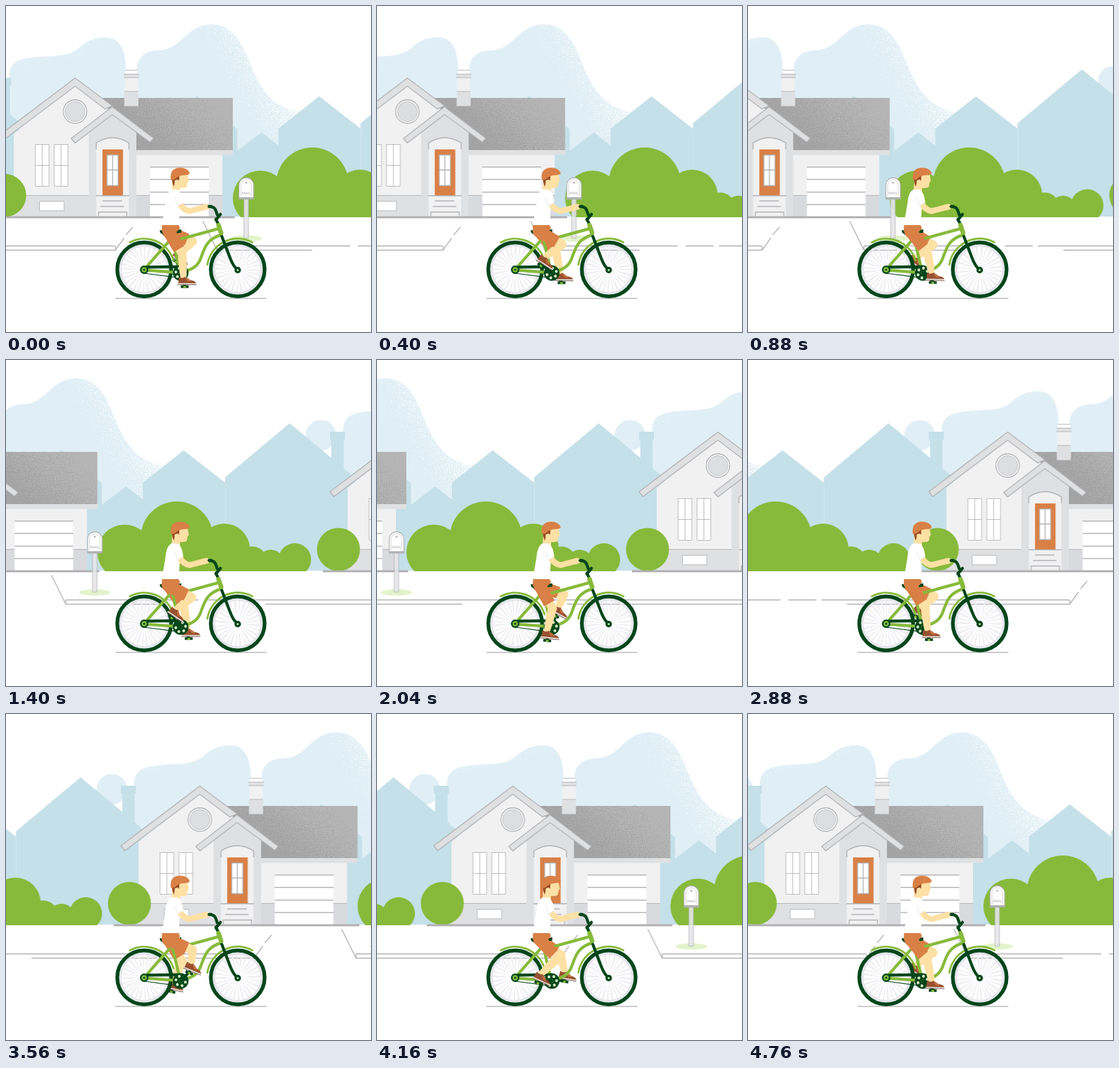
An HTML page without scripts that plays this animation: 560 by 500 pixels, repeating every 4.8 s.

```html
<!DOCTYPE html>
<html lang="en">
<head>
<meta charset="utf-8">
<title>Bike ride</title>
<style>
  @property --f { syntax: '<number>'; inherits: true; initial-value: 0; }
  @keyframes ride { to { --f: 120; } }

  html, body { margin: 0; width: 100%; height: 100%; overflow: hidden; background: #fff; }
  body { position: relative; animation: ride 4.8s steps(120) -1ms infinite; }
  svg { position: absolute; left: 0; top: 0; height: 500px; }
  .town { width: 1300px; will-change: transform; transform: translateX(calc(var(--f) * -5.94px)); }
  .road { width: 1400px; will-change: transform; transform: translateX(calc(var(--f) * -6.64px)); }
  .rider { width: 560px; }

  .wall { fill: #f1f1f2; }
  .shade { fill: #dfe0e2; }
  .line { fill: none; stroke: #b1b1b3; stroke-width: 1.4; }
  .trim { stroke: #b1b1b3; stroke-width: 1.3; }
  .fine { stroke-width: .9; }
  .white { fill: #fff; }
  .far-house { fill: #c5e0e9; }
  .leaf { fill: #87ba3a; }
  .orange { fill: #d98046; }
  .skin { fill: #fde0a4; }
  .dark { fill: #00461b; }
  .tube, .rod { fill: none; stroke: #87ba3a; stroke-width: 4.5; stroke-linecap: round; stroke-linejoin: round; }
  .rod { stroke: #00461b; }
  .thin { stroke-width: 1.2; }
  .slim { stroke-width: 3; }
  .thick { stroke-width: 7; }
  .limb { fill: none; stroke: #fde0a4; stroke-width: 9; stroke-linecap: round; stroke-linejoin: round; }

  /* The pedal angle sets foot and thigh; the shin spans from knee to ankle. */
  .rider { --turn: calc((72 + 14.85 * var(--f)) * 1deg); }
  .near { --t: var(--turn); }
  .far { --t: calc(var(--turn) + 180deg); }
  .leg {
    --tilt: calc(17deg - 17deg * cos(var(--t) - 60deg));
    --thigh: calc(40deg + 21deg * sin(var(--t) - 10deg));
    --px: calc(18 + 20 * cos(var(--t)));
    --py: calc(62.5 + 20 * sin(var(--t)));
    --dx: calc(var(--px) - 2 * cos(var(--tilt)) + 12 * sin(var(--tilt)) - 39 * cos(var(--thigh)));
    --dy: calc(var(--py) - 2 * sin(var(--tilt)) - 12 * cos(var(--tilt)) - 39 * sin(var(--thigh)));
    transform: translate(250px, 347px);
  }
  .thigh { transform: rotate(var(--thigh)); }
  .shin {
    transform: rotate(var(--thigh)) translate(39px) rotate(calc(-1 * var(--thigh)))
      rotate(atan2(var(--dy), var(--dx))) scaleX(calc(hypot(var(--dx), var(--dy)) / 35));
  }
  .foot { transform: translate(calc(1px * var(--px)), calc(1px * var(--py))) rotate(var(--tilt)); }
  .crank { transform: translate(268px, 409.5px) rotate(var(--t)); }
  .spin { transform: rotate(calc(var(--f) * 8.91deg)); }
</style>
</head>
<body>

<svg class="town" viewBox="0 0 1300 500">
  <defs>
    <filter id="grain" x="0" y="0" width="1" height="1" color-interpolation-filters="sRGB">
      <feTurbulence type="fractalNoise" baseFrequency=".75" numOctaves="1" seed="4" result="noise"/>
      <feComposite in="SourceAlpha" in2="noise" operator="arithmetic" k2="1" k3="1" k4="-1"/>
      <feColorMatrix values="0 0 0 0 1  0 0 0 0 1  0 0 0 0 1  0 0 0 9 0"/>
    </filter>
    <linearGradient id="mist" gradientUnits="userSpaceOnUse" x1="290" y1="110" x2="385" y2="60">
      <stop stop-opacity=".17"/><stop offset="1" stop-opacity=".56"/>
    </linearGradient>
    <linearGradient id="haze" gradientUnits="userSpaceOnUse" x1="60" y1="125" x2="45" y2="75">
      <stop stop-opacity=".15"/><stop offset="1" stop-opacity=".42"/>
    </linearGradient>
    <linearGradient id="sun" gradientUnits="userSpaceOnUse" x1="225" y1="225" x2="315" y2="125">
      <stop stop-opacity=".36"/><stop offset="1" stop-opacity=".8"/>
    </linearGradient>
    <clipPath id="lawn"><path d="M-40 200H700V324H-40z"/></clipPath>
    <path id="cloudA" d="M5 225V106Q6 84 30 80.500C62 74 92 82 112 64 128 50 140 48 155 48 176 49 184 70 184 98V225z"/>
    <path id="cloudB" d="M201 225V92C204 76 216 69 232 68 272 68 274 28 317 28 352 30 364 62 376 92 390 128 410 158 452 163L419 190V225z"/>
    <path id="roof" d="M148 141H348V221H190z"/>

    <g id="block">
      <g fill="#e0eff6">
        <circle cx="-29" cy="115.500" r="23.500"/>
        <use href="#cloudA"/><use href="#cloudB"/>
      </g>
      <use href="#cloudA" fill="url(#haze)" filter="url(#grain)" opacity=".7"/>
      <use href="#cloudB" fill="url(#mist)" filter="url(#grain)"/>
      <path class="far-house" d="M-176 323V180L-77 97-13 150V122H-15V110H8V122H6V166L22 180V323z
        M231 323V189L293 138 355 189V323zM355 323V222L392 194 418 214V323z
        M418 323V188L480.500 138.500 544 188V323z"/>
      <path d="M-176 188V323" stroke="#fff" stroke-width=".8" opacity=".7"/>
      <g class="leaf" clip-path="url(#lawn)">
        <circle cx="390" cy="294.500" r="42"/><circle cx="470" cy="272.500" r="55.500"/>
        <circle cx="543" cy="290" r="39"/><circle cx="586" cy="308" r="22"/>
        <circle cx="614" cy="311" r="20"/><circle cx="651" cy="306" r="25"/>
        <path d="M390 290H560V314H651V324H390z"/>
      </g>

      <!-- garage -->
      <path class="wall" d="M195 221H332V323H195z"/>
      <path fill="#d9dadd" d="M195 290H332V323H195z"/>
      <path class="line fine" d="M200 290.500H332"/>
      <path class="white" d="M221 246H311V323H221z"/>
      <path class="line" d="M221 247H311M221 266H311M221 285.500H311M221 304.500H311"/>
      <use href="#roof" fill="#a3a3a3"/>
      <use href="#roof" fill="url(#sun)" filter="url(#grain)" opacity=".2"/>
      <path class="shade" d="M195 221H348V228.500H195z"/>
      <path class="white" d="M183 98H202V104H183z"/>
      <path class="wall" d="M182 110H202.500V153H182z"/>
      <path class="shade" d="M181 104H204V110H181zM181.500 131H203V153.500H181.500z"/>
      <path class="line fine" d="M183 98.500H202M181 104.500H204M181 110H204M182 131H203"/>

      <!-- main gable -->
      <path class="wall" d="M12 196 106 120 200 192V323H12z"/>
      <path class="shade" d="M12 290H140V323H12z"/>
      <path class="line fine" d="M12 290.500H128"/>
      <path class="shade" d="M127 187 163 160 200 187V323H127z"/>
      <path class="shade trim" d="M106 110.500-15 202-9 209.500 106 123 152 158 163 153z"/>
      <circle class="white trim" cx="106" cy="162" r="18"/>
      <circle cx="106" cy="162" r="15.500" fill="#dcdee0" stroke="#c4c5c8"/>
      <path class="white" d="M45 212H66V276H45zM74 212H95V276H74z"/>
      <path class="line fine" d="M45 212V276M55.500 212V276M66 212V276M74 212V276M84.500 212V276M95 212V276
        M45 212.500H66M74 212.500H95M45 244.500H66M74 244.500H95M45 276.500H66M74 276.500H95"/>
      <path class="white trim fine" d="M51.500 299.500H89V314H51.500z"/>

      <!-- porch -->
      <path class="wall" d="M138.500 323V210Q163 194 188.500 210V323z"/>
      <path class="line" d="M138.500 220V210Q163 194 188.500 210V220"/>
      <path class="shade trim" d="M163 154.500 100 203 106 210 163 166.500 221 209 226.500 203z"/>
      <path class="orange" d="M148 220H179.500V291H148z"/>
      <path class="white trim" d="M155 228.500H172V275.500H155z"/>
      <path class="line" d="M163.500 228V276M155 251.500H172"/>
      <path class="line" d="M138 291H189M148 299H178M145 307.500H181M142 323V316H185.500V323"/>
      <circle class="leaf" cx="-2" cy="290.500" r="33"/>
      <path d="M-26 324H351" stroke="#b0aeb0" stroke-width="3"/>
    </g>
  </defs>
  <use href="#block" x="1440"/><use href="#block" x="720"/><use href="#block"/>
</svg>

<svg class="road" viewBox="0 0 1400 500">
  <defs>
    <g id="street">
      <path class="line" d="M-213 368H167M330 368H528M540 368H583M-174 374.500H168V368
        M168 374 181 356M184 351 194.500 339M302 330 324 374.500H469.500M324 368V374.500M324 368H332"/>
      <ellipse cx="368.500" cy="356.500" rx="24" ry="5" fill="#e3f3cb"/>
      <path class="trim fine" d="M365 296H372V356H365z" fill="#e6e6e9" opacity=".9"/>
      <path class="white trim" d="M357.500 294V275A11.200 11.500 0 0 1 379.900 275V294z"/>
      <path class="line fine" d="M360.500 292V275A8 8.500 0 0 1 376.500 275V292" opacity=".6"/>
      <path d="M357 295.500H380.500" stroke="#b1b1b3" stroke-width="2.500"/>
      <circle cx="368.500" cy="271" r="1.500" fill="#b1b1b3"/>
      <text x="368.800" y="289" text-anchor="middle" font-family="Lato, sans-serif" font-weight="700"
        font-size="5" letter-spacing=".3" fill="#b1b1b3">MAIL</text>
    </g>
  </defs>
  <use href="#street"/><use href="#street" x="804"/>
</svg>

<svg class="rider" viewBox="0 0 560 500">
  <defs>
    <g id="wheel">
      <circle r="36.500" fill="none" stroke="#e4e4ea" stroke-width="3.500"/>
      <g class="spin">
        <circle r="18" fill="none" stroke="#e6e6ec" stroke-width="36" pathLength="28" stroke-dasharray=".2 .8"/>
        <circle r="26" fill="none" stroke="#eeeef3" stroke-width="20" pathLength="14" stroke-dasharray=".2 .8"/>
      </g>
      <circle r="41.300" fill="none" stroke="#00461b" stroke-width="5.700"/>
    </g>
    <g id="shoe">
      <path class="dark" d="M-6 0H6V4H-6z"/>
      <path class="leaf" d="M-2 1H2V4H-2z"/>
      <path d="M-10-3-9-13Q-4-10 1-13L9-8Q17-7 17.500-3z" fill="#985030"/>
      <path d="M2-11 6-6M5-10 9-6" stroke="#d98046" stroke-width="1.300"/>
      <path d="M-11-2.500H18" stroke="#e9e2de" stroke-width="2"/>
      <path d="M-11-1.200H18" stroke="#7e5a4a" stroke-width="1"/>
    </g>
    <path id="calf" class="skin" d="M0-6.500Q14-7 36-4.500V4.500Q16 7 0 6.500A6.500 6.500 0 0 1 0-6.500z"/>
    <path id="knee" class="skin" d="M15-7H39A6.500 6.500 0 0 1 39 6.500H15z"/>
    <path id="shorts" class="orange" d="M-2-10 30-9V9.500L-2 9A9.500 9.500 0 0 1-2-10z"/>
    <path id="arm" class="rod" d="M0 0H20"/>
  </defs>

  <path d="M168 448.500H399.500" stroke="#b7b7b9" stroke-width="1.600"/>

  <g class="far">
    <g class="crank"><use href="#arm"/></g>
    <g class="leg">
      <g class="shin"><use href="#calf"/></g>
      <g class="thigh"><use href="#knee"/><use href="#shorts"/></g>
      <g class="foot"><use href="#shoe"/></g>
    </g>
  </g>

  <use href="#wheel" x="212" y="404"/>
  <use href="#wheel" x="355.500" y="404"/>

  <!-- fenders and frame -->
  <path class="tube slim" d="M190 362.500A47 47 0 0 1 257 390M309 396.500A47 47 0 0 1 378 362.500"/>
  <path class="tube" d="M212 404 250 361M212 405 266 409M254 352 267 407M262 359 328 341
    M330 351C306 358 304 374 298 389 293 400 285 405 268 408"/>
  <path class="rod" d="M331 353 344 387Q349 400 355.500 404.500"/>
  <path class="rod" d="M312 307.500C322 308 322 314 324 320M322 328 329 319.500M322 327 325 333"/>
  <path class="tube thick" d="M326 336 330 348"/>
  <circle class="dark" cx="355.500" cy="405" r="5"/><circle cx="355.500" cy="405" r="1.600" fill="#cfe3b4"/>
  <path class="rod" d="M217 400.500 266 400"/>
  <path class="rod thin" d="M213 410 266 417"/>
  <circle class="dark" cx="212" cy="404.500" r="6.500"/><circle class="leaf" cx="212" cy="404.500" r="4"/>
  <circle class="dark" cx="212" cy="404.500" r="1.600"/>

  <g class="near">
    <g class="crank">
      <circle class="dark" r="12"/>
      <circle r="7.500" fill="none" stroke="#d6e6c0" stroke-width="4.400" stroke-linecap="round" pathLength="6" stroke-dasharray="0 1"/>
      <circle class="leaf" r="2.500"/>
      <use href="#arm"/>
    </g>
    <path class="dark" d="M236 344Q244 343 252 345L269 342.500V347.500L254 350 243 351Q235 349 236 344z"/>
    <g class="leg">
      <g class="shin"><use href="#calf"/></g>
      <g class="thigh"><use href="#knee"/><use href="#shorts"/></g>
      <g class="foot"><use href="#shoe"/></g>
    </g>
  </g>

  <!-- upper body -->
  <path class="orange" d="M239.500 335H264.500L267 341 254 355Q241 353 239 345z"/>
  <path class="skin" d="M256 255H278L280.500 268 278.500 271 277.500 277Q275 280 267 279V284L262 287 254 283z"/>
  <path class="white" d="M255 281Q246 284 244.500 304L239 336H265L267 304Q270 286 264 282z"/>
  <path class="limb" d="M265 299Q270 313 282 314.500L303 309 307.500 308"/>
  <path class="rod" d="M311.500 307.500H315"/>
  <path class="white" d="M256 283 264 281.500Q270 286 272 301L262.500 307z"/>
  <path d="M259 293 263 307 272 301.500" fill="none" stroke="#ececee"/>
  <path d="M254.500 261H266L265.500 268 263 266 259.500 268 257.500 277Q254.500 272 254.500 261z" fill="#974c25"/>
  <circle class="skin" cx="261.500" cy="269.500" r="2.800"/>
  <path class="orange" d="M253 267Q250 249 266 248 279 247.500 282 257 279 259.500 273 259.500 264 260 259 266z"/>
</svg>
</body>
</html>
```
